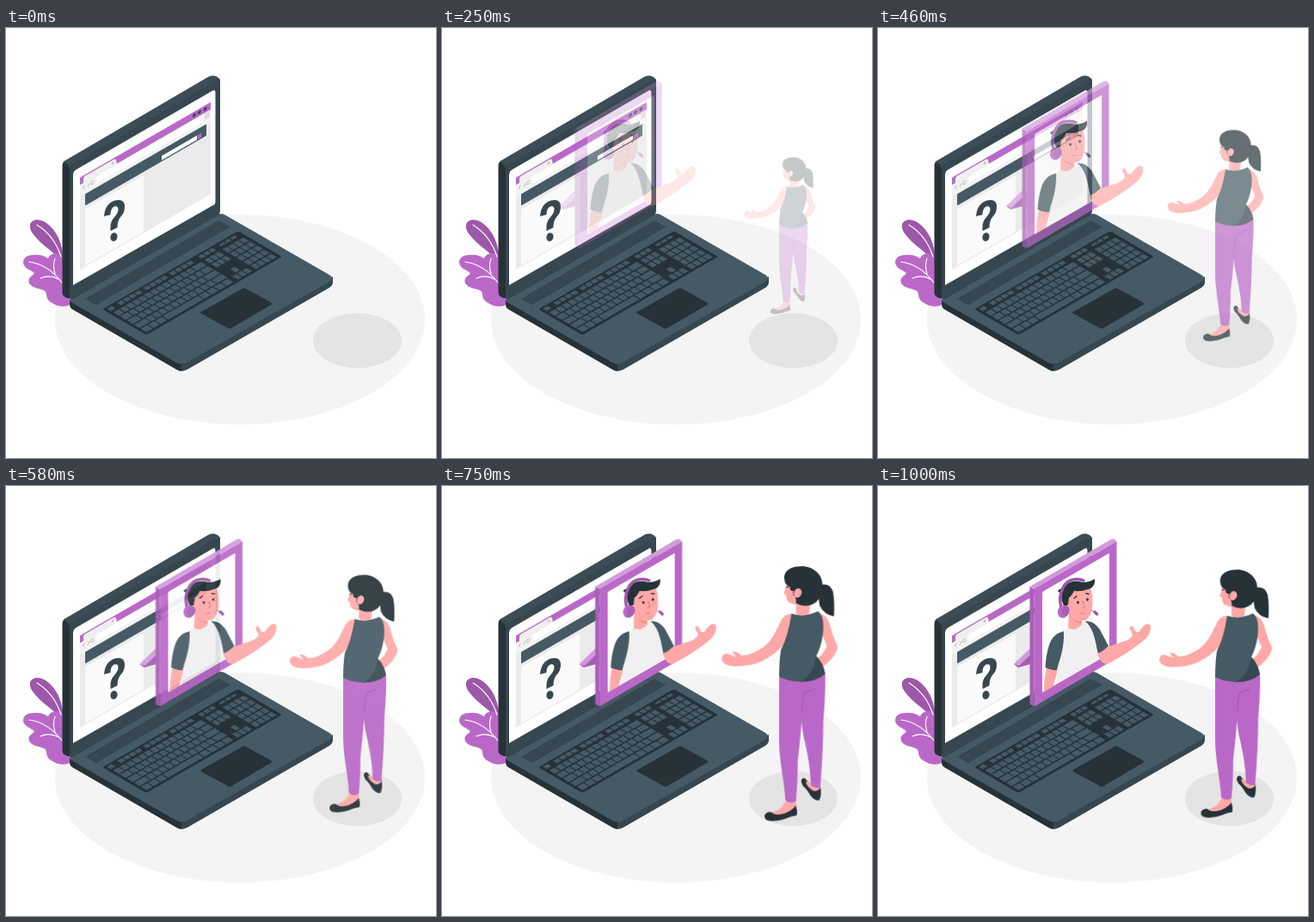
Write an HTML page that moves like this. It is 500 px wide and 500 px high and loops after 1040 ms.

```html
<!DOCTYPE html>
<html lang="en">
<head>
<meta charset="utf-8">
<title>Online help</title>
<style>
  html, body { margin: 0; width: 100%; height: 100%; overflow: hidden; background: #fff; }
  svg { display: block; width: 100vw; height: 100vh; }
  #popup, #woman { opacity: 0; }
  #woman { transform-origin: 392.7px 241.3px; }
  .purple { fill: #ba68c8; }
  .skin { fill: #ffa8a7; }
  .slate { fill: #455a64; }
  .deep { fill: #37474f; }
  .ink { fill: #263238; }
  .line { fill: none; stroke-linecap: round; stroke-linejoin: round; }
</style>
</head>
<body>
<svg viewBox="0 0 500 500">
  <ellipse cx="272" cy="339" rx="215" ry="122" fill="#f4f4f4"/>
  <ellipse cx="408.5" cy="363.5" rx="51.5" ry="32" fill="#e4e4e4"/>

  <g id="plant">
    <path fill="#9e58aa" d="M67 274C60 263 40 252 31 239C25 230 28 223 37 223C48 224 56 234 61 244C65 253 67 263 67 274Z"/>
    <path class="purple" d="M78 319C72 325 62 325 56 321C49 318 47 314 47 309C46 304 40 304 34 302C26 299 25 293 28 290C30 287 34 287 32 284C27 281 21 279 20 273C20 267 25 264 31 264C38 263 44 264 49 268C51 262 58 261 66 263L78 300Z"/>
    <path class="line" stroke="#fff" stroke-width="1.1" d="M36 229C49 237 59 250 64 266M27 272C42 274 55 283 65 296M40 291C47 288 54 288 61 292M57 268C55 274 55 280 57 286"/>
  </g>

  <g id="laptop">
    <path class="ink" d="M74 316V322Q74 325 77 327L198 397Q201 399 204 399V388Z"/>
    <path class="deep" d="M204 388V399Q207 399 211 397L376 302Q380 299 380 296V289Z"/>
    <path class="slate" d="M76 315L246 217Q250 215 254 217L376 287Q382 291 376 295L210 389Q204 392 198 389L76 319Q73 317 76 315Z"/>
    <path class="deep" d="M92 315L247 224L261 231L105 322Z"/>
    <g id="keys" transform="matrix(1.58 -.91 .51 .3 112 327)">
      <rect class="ink" width="100" height="100" rx="1.5" ry="4"/>
    </g>
    <path class="ink" d="M227 330L275 303Q277 302 279 303L308 319Q310 321 308 322L262 349Q260 350 258 349L227 332Q225 331 227 330Z"/>

    <path class="ink" d="M65.500 160Q65.500 156 69 154L78 158V312Q74 316 69 313Q65.500 311 65.500 308Z"/>
    <path class="deep" d="M69 154L235 57Q243 53 249 60V212Q249 216 246 218L78 315Q74 317 74 311V164Q73 160 67 156Z"/>
    <path class="slate" opacity=".35" d="M68 155L235 57Q243 53 248 59L75 160Z"/>
    <path fill="#fff" d="M78 170Q78 167 81 165L240 73Q243.500 71 243.500 75V202Q243.500 205 241 206L78 299Z"/>

    <g transform="matrix(1 -.577 0 1 86 174)">
      <rect width="152" height="107" fill="#ebebeb"/>
      <rect y="8" width="152" height="14.500" fill="#f3f3f3"/>
      <rect class="purple" width="152" height="8.500"/>
      <path fill="#f0f0f0" d="M4 9V4Q4 1.500 6 1.500H39Q41.500 1.500 42 4L43 9Z"/>
      <rect x="19" y="10" width="121" height="8" fill="#fff"/>
      <path class="line" stroke="#9e9e9e" stroke-width=".6" d="M5 12L3.500 14L5 16M9 12L10.500 14L9 16M16 13A2 2 0 1 0 16 15M37 4L39 6M39 4L37 6M145.500 10.500H150.500M145.500 13H150.500M145.500 15.500H150.500"/>
      <g class="deep">
        <circle cx="133" cy="4.200" r="2"/><circle cx="139" cy="4.200" r="2"/><circle cx="145.500" cy="4.200" r="2"/>
      </g>
      <rect class="slate" x="6" y="22.500" width="141" height="13.500" rx="1"/>
      <rect x="95" y="29.500" width="41" height="5" fill="#fff"/>
      <rect class="purple" x="136.500" y="29.500" width="5" height="5"/>
      <rect x="6" y="40" width="68" height="65.500" fill="#fafafa"/>
    </g>
    <path class="deep" d="M114 219Q115 204 127 200.500Q138 198 138 208Q138 215 133 220Q129.500 224 129.500 232L121.500 236V231Q121.500 225 126 220Q130.500 215 130.500 211Q130.500 206 126 207.500Q121.500 209.500 121.500 217Z"/>
    <ellipse class="deep" cx="125.500" cy="243" rx="4" ry="5" transform="rotate(15 125.500 243)"/>
  </g>

  <g id="popup">
    <path fill="#d29bdb" d="M158 207L176.500 189L181.500 192L163 211Z"/>
    <path fill="#a55db2" d="M158 207L163 211L181.500 206V192L164 209Z"/>
    <path fill="#a95fb6" d="M176.500 117L181.500 120V256L178 254.500Q176.500 253.500 176.500 252Z"/>
    <path fill="#d29bdb" d="M176.500 117L271 62Q273 61 275 62L277.500 64.500L181.500 120Z"/>
    <path class="purple" d="M181.500 120L277.500 64.500V198Q277.500 200 276 201L184 255Q181.500 257 181.500 254Z"/>
    <path fill="#fff" d="M191 125Q191 123 193 122L269 78V195L191 240Z"/>

    <path class="skin" d="M196 210L209 213Q207 223 203.500 233L193 239Q193 224 196 210Z"/>
    <path fill="#f0f0f0" d="M215 169L221 165Q230 170 237 160L241 157L252 170L256 202L207 230.500L210 200Z"/>
    <path class="slate" d="M216 169C207 171 202 176 199 185C196 194 195 203 194.500 211Q202 215 208 214C211 202 217 188 216 169Z"/>
    <path class="slate" d="M241 157C249 157 254 161 258 167L268 186Q264 193 256 196C253 183 252 167 241 157Z"/>
    <path class="skin" d="M255 195Q262 192 267 187L288 180Q293 178 296 174Q296 170 293 167Q292 163 296 163L300 170L303 170Q307 164 311 161Q316 159 317 163Q318 169 312 177C301 187 282 199 267 207Q259 208 255 195Z"/>
    <path class="skin" d="M222 147L237 153L237 161Q229 170 221 165Z"/>
    <path fill="#f28f8f" d="M225 153Q230 158 237 157V160Q228 159 225 153Z"/>
    <path class="skin" d="M220 125L246 116Q250 124 249.500 138Q249 149 243 155Q239 158 232 155Q222 151 220 143Z"/>
    <path class="ink" d="M217 141C214 136 213 130 213 126L209 122Q211 119 216 119C219 111 229 109 238 112Q246 112 252 108Q253 117 246 119.500Q237 123 228 122Q225 128 222 130L221 138Z"/>
    <path class="line" stroke="#9e58aa" stroke-width="3.600" d="M213 141C209 126 216 109 229 108.500Q235 108 239 110"/>
    <ellipse class="purple" cx="215.500" cy="146" rx="6.500" ry="7.500" transform="rotate(20 215.500 146)"/>
    <ellipse fill="#a95fb6" cx="218" cy="145.500" rx="4.500" ry="6" transform="rotate(20 218 145.500)"/>
    <path class="line" stroke="#9e58aa" stroke-width="3.400" d="M252 146.500L254.500 149"/>
    <path class="line" stroke="#9e58aa" stroke-width=".8" d="M248.500 144.500L252 146.500"/>
    <ellipse class="ink" cx="232.500" cy="135.500" rx="1.300" ry="1.800"/>
    <ellipse class="ink" cx="243.500" cy="132" rx="1.300" ry="1.800"/>
    <path class="line" stroke="#263238" stroke-width="1.300" d="M228 130.500L231 128M242 125L245 125.500"/>
    <path class="line" stroke="#e56f72" stroke-width="1" d="M238 134L240.500 140.500L238 141.500M235.500 148.500Q237.500 147 240 148"/>
  </g>

  <g id="woman">
    <path class="skin" d="M436 150Q446 152 449 162Q453 178 457 185Q459 189 457 193C453 202 447 207 440 212L434 202Q443 196 446 187Q441 177 438 165Z"/>
    <path class="ink" d="M417 341Q417 337 421 337Q424 341 428 344L438.500 346Q440.500 355 437.500 362Q432 363 427 356Q423 349 419 346Z"/>
    <path class="skin" d="M422 340.500L428 342L438 345V349Q433 354 428 349.500Q423 346 422 340.500Z"/>
    <path class="skin" d="M400 361H411V373Q403 380 389 380L382 376Q396 374 400 361Z"/>
    <path class="ink" d="M376 378Q379 374.500 383 375.500Q386 379 394 378Q405 376 411 368Q413 374 412 379Q405 380 399 383Q388 387 379 385Q374 383 376 378Z"/>
    <path class="purple" d="M405 222L444 217Q445 237 442 271Q442 306 438.500 347Q433 350 428 345Q427 322 422 300Q417 280 416 258Z"/>
    <path class="purple" d="M392 220L434 224Q424 238 418 259Q417 285 413 318Q413 343 411 363Q405 367 399 362C398 340 392 318 392 295Z"/>
    <path class="line" stroke="#9e58aa" stroke-width="1" d="M418 263Q418 247 421 240Q427 239 432 236"/>
    <path class="skin" d="M410 151Q400 150 395 157C388 171 383 185 369 192Q357 199 349 198Q344 193 339 194Q341 197 344 200L333 196Q327 196 327 203Q330 210 341 210.500Q358 211 372 205Q387 198 400 183Z"/>
    <path class="slate" d="M406 151Q421 155 436 148Q442 152 442 165C442 178 439 189 434 199Q442 207 444 219Q434 228 416 228Q400 227 392 222Q392 205 394 192Q402 177 406 151Z"/>
    <path class="deep" d="M434 199Q442 207 444 219Q434 228 416 228Q431 220 434 199Z"/>
    <path class="skin" d="M411 136H428L426 151Q418 155 411 151Z"/>
    <path class="ink" d="M437 119Q449 115 453 126Q455 138 454 154Q443 152 438 142Q436 133 437 119Z"/>
    <path class="skin" d="M401 113Q399 119 399 124L397 128L400 130Q400 138 405 139Q412 142 418 139L421 118Z"/>
    <path class="ink" d="M398 112C396 103 406 97 415 97.500C429 96 441 106 441 118C442 130 435 142 422 142Q415 142 411 139Q412 133 408 130L408 125Q404 126 404 120Q398 118 398 112Z"/>
    <ellipse class="skin" cx="413" cy="127.500" rx="4.300" ry="5.500" transform="rotate(20 413 127.500)"/>
    <path class="line" stroke="#263238" stroke-width="1.200" d="M400.500 121L403 120"/>
  </g>
</svg>
<script>
  const $ = id => document.getElementById(id);

  function key(x, y, w, h = 13) {
    const r = document.createElementNS('http://www.w3.org/2000/svg', 'rect');
    Object.entries({ x, y, width: w, height: h, class: 'slate', rx: .4, ry: 1.2 })
      .forEach(([name, value]) => r.setAttribute(name, value));
    $('keys').append(r);
  }

  function keyRow(x, y, count, pitch, h) {
    for (let i = 0; i < count; i++) key(x + i * pitch, y, pitch - .7, h);
  }

  function buildKeys() {
    const rowY = r => 18.5 + r * 15.8;
    key(2, 4, 3.6, 9);
    [9.5, 28.5, 47.5].forEach(x => keyRow(x, 4, 4, 4.2, 9));
    keyRow(69, 4, 3, 3.8, 9);
    keyRow(84, 5, 3, 4.2, 6);
    for (let r = 0; r < 4; r++) {
      const first = 4 + r * 1.3;
      const count = r < 2 ? 12 : 11;
      key(2, rowY(r), first);
      keyRow(2.7 + first, rowY(r), count, 4.4);
      const x = 2.7 + first + count * 4.4;
      key(x, rowY(r), 66.5 - x);
    }
    keyRow(2, rowY(4), 3, 5.3);
    key(17.9, rowY(4), 26);
    keyRow(44.6, rowY(4), 4, 5.5);
    [0, 1, 4].forEach(r => keyRow(69, rowY(r), 3, 3.8));
    key(72.8, rowY(3), 3.1);
    for (let r = 0; r < 5; r++) keyRow(82.5, rowY(r), 4, 4);
  }

  // Cubic bezier (.36, -.01, .5, 1.38), solved by bisection.
  function ease(t) {
    const curve = (s, a, b) => 3 * (1 - s) ** 2 * s * a + 3 * (1 - s) * s * s * b + s ** 3;
    let lo = 0, hi = 1;
    for (let i = 0; i < 30; i++) {
      const mid = (lo + hi) / 2;
      if (curve(mid, .36, .5) < t) lo = mid; else hi = mid;
    }
    return curve(lo, -.01, 1.38);
  }

  const LOOP = 1040, FPS = 24;

  function play(id, transform) {
    const steps = [];
    for (let n = 0; n <= FPS; n++) {
      const p = n < 2 ? 0 : ease(Math.min(1, (n + .5) / FPS));
      steps.push({
        offset: Math.floor(n * 100 / FPS + .5) * 10 / LOOP,
        opacity: Math.min(1, p),
        transform: transform(p),
        easing: 'steps(1, end)'
      });
    }
    steps.push({ ...steps[FPS], offset: 1 });
    $(id).animate(steps, { duration: LOOP, iterations: Infinity });
  }

  buildKeys();
  play('popup', p => `translateX(${30 * (p - 1)}px)`);
  play('woman', p => `scale(${.5 + p / 2})`);
</script>
</body>
</html>
```
